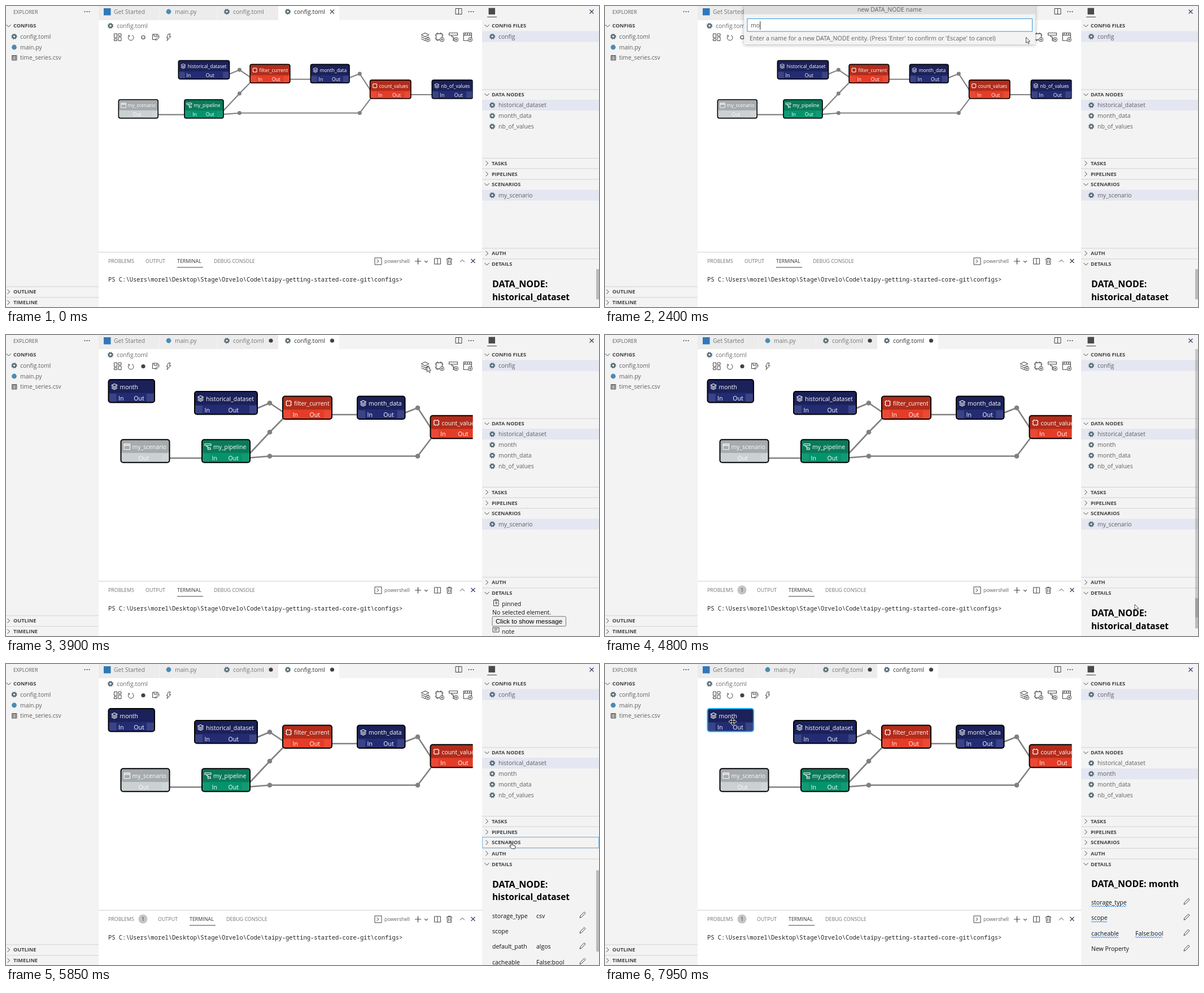
An HTML page for the animation above (8 s loop, 1050 by 533 pixels).

```html
<!DOCTYPE html>
<html lang="en">
<head>
<meta charset="utf-8">
<title>Pipeline editor</title>
<style>
  html, body { margin: 0; width: 100%; height: 100%; overflow: hidden; background: #fff; }
  svg { display: block; width: 100vw; height: 100vh; }
  text { font-family: "Open Sans", "Noto Sans", sans-serif; white-space: pre; }
  .mono { font-family: "Noto Sans Mono", "DejaVu Sans Mono", monospace; }
  .arial { font-family: "Liberation Sans", Arial, sans-serif; }
</style>
</head>
<body>
<svg viewBox="0 0 1050 533">
  <defs>
    <clipPath id="canvas"><rect x="164" y="70" width="662.5" height="365"/></clipPath>
    <filter id="shadow" x="-5%" y="-30%" width="110%" height="160%">
      <feDropShadow dx="0" dy="1" stdDeviation="3" flood-opacity=".3"/>
    </filter>
  </defs>
  <g id="base"></g>
  <g id="scene"></g>
</svg>
<script>
const LOOP = 8000, STEP = 150;
const INK = '#424242', TEXT = '#606060';

// Drawing helpers
const text = (x, y, s, size = 10.4, fill = TEXT, weight = 400, cls = '') =>
  `<text x="${x}" y="${y}" font-size="${size}" fill="${fill}" font-weight="${weight}" class="${cls}">${s}</text>`;
const rect = (x, y, w, h, fill, extra = '') =>
  `<rect x="${x}" y="${y}" width="${w}" height="${h}" fill="${fill}" ${extra}/>`;
const dot = (x, y, r, fill, extra = '') => `<circle cx="${x}" cy="${y}" r="${r}" fill="${fill}" ${extra}/>`;
const path = (d, stroke = INK, width = 1, fill = 'none') =>
  `<path d="${d}" stroke="${stroke}" stroke-width="${width}" fill="${fill}" stroke-linejoin="round"/>`;
const at = (x, y, body, scale = 1) => `<g transform="translate(${x} ${y}) scale(${scale})">${body}</g>`;

const ICONS = {
  layers: 'M0-5L5-2.5L0 0L-5-2.5ZM-5 0L0 2.5L5 0M-5 2.5L0 5L5 2.5',
  chip: 'M-4-4H4V4H-4ZM-2-5.5V-4M2-5.5V-4M-2 4V5.5M2 4V5.5M-5.5-2H-4M-5.5 2H-4M4-2H5.5M4 2H5.5',
  pipe: 'M-5.5-5H5.5V-2H-5.5ZM-2-2V0H0V4M0 2H4.5V5H0Z',
  clap: 'M-5-2H5.5V5H-5ZM-5-2V-5H5.5V-2M-2.5-5L-3.5-2M.5-5L-.5-2M3.5-5L2.5-2',
  down: 'M-4-2L0 2L4-2',
  right: 'M-2-4L2 0L-2 4',
  up: 'M-4 2L0-2L4 2',
  close: 'M-3.5-3.5L3.5 3.5M3.5-3.5L-3.5 3.5',
  split: 'M-5.5-5H5.5V5H-5.5ZM0-5V5',
  plus: 'M-5.5 0H5.5M0-5.5V5.5',
  trash: 'M-5-4H5M-2-4V-5.5H2V-4M-4-4L-3.5 5.5H3.5L4-4M-1.5-2V3.5M1.5-2V3.5',
  prompt: 'M-6-6H6V6H-6ZM-2.5-3L1 0L-2.5 3',
  layout: 'M-6.5-6H-1.5V1H-6.5ZM-6.5 3H-1.5V6.5H-6.5ZM1-6H6V-2H1ZM1 0H6V6.5H1Z',
  refresh: 'M-3.5-3A4.8 4.8 0 1 0 2-4.4M-5-4H-2.6V-1.5',
  save: 'M0 4.5H-5.5V-5H3.5L5.5-3V-1M-3-5V-1.5H2.5V-5M0 5.5L.7 3L5-1.5L6.5 0L2.5 4.5Z',
  zap: 'M-.5-6H3L1-1.5H4L-3 6L-1.2.7H-3.6Z',
  pencil: 'M-5 5.5L-4 2L2.8-5L5-2.8L-1.8 4.2Z',
  clip: 'M-2-4H-4.5V6H4V-4H2M-2-3V-5.5H2V-3ZM0 4V-.5M-2 1.3L0-.7L2 1.3',
  note: 'M-5.5-4.5H5.5V3.5H-5.5ZM-3-2H3M-3 .5H2'
};
const icon = (name, x, y, color = INK, width = 1, scale = 1) =>
  at(x, y, path(ICONS[name], color, width / scale), scale);
const gear = (x, y) =>
  dot(x, y, 2.9, 'none', 'stroke="#546a75" stroke-width="2.2"') +
  dot(x, y, 4.4, 'none', 'stroke="#546a75" stroke-width="1.5" stroke-dasharray="1.73"');
const more = (x, y) => [-4, 0, 4].map(d => dot(x + d, y, 1, INK)).join('');
const wave = (x, y, w) => path(`M${x} ${y}q1-2.4 2 0` + 't2 0'.repeat(w / 2 - 1), '#2a85ea', 1);

const header = (x, y, s, open) =>
  icon(open ? 'down' : 'right', x - 8.5, y) + text(x, y + 3.4, s, 9.2, INK, 700);
const rule = (y, x = 843, w = 207) => rect(x, y, w, 1, '#d2d2d2');
const item = (y, s) => gear(861, y) + text(872, y + 3.7, s);
const selected = y => rect(843, y - 9.5, 207, 19, '#e4e6f1');

// Parts that never change
function base() {
  const tabs = [[164, 107], [272, 101], [374, 108]].map(([x, w]) => rect(x, 0, w, 25, '#ececec')).join('');
  const tools = ['layers', 'chip', 'pipe', 'clap'].map((name, i) => {
    const x = 743 + i * 25;
    return icon(name, x - 1, 54.5, INK, 1.1, 1.35) + dot(x + 4, 59.5, 3.6, '#fff', `stroke="${INK}"`) +
      path(`M${x + 2} 59.5h4m-2-2v4`, INK, .9);
  }).join('');
  return rect(0, 0, 1050, 533, '#fff') + rect(0, 0, 164, 533, '#f3f3f3') + rect(164, 0, 680, 25, '#f3f3f3') +
    rect(843, 0, 207, 533, '#f3f3f3') + tabs + rect(482, 0, 108, 25, '#fff') +
    // explorer
    text(13, 13.5, 'EXPLORER', 9.1) + more(143.5, 10) + header(13, 35, 'CONFIGS', true) +
    gear(14.5, 54) + text(25, 57.7, 'config.toml') +
    dot(14.5, 73, 4.4, '#4a8bb4') + text(25, 76.7, 'main.py') +
    rect(10, 87, 9.5, 9.5, '#6d6d6d', 'rx="1"') + path('M11 89.8H18.5M11 92H18.5M11 94.2H18.5M14.7 89V95.5', '#f3f3f3', .7) +
    text(25, 95.4, 'time_series.csv') +
    rule(496.5, 0, 164) + header(13, 506, 'OUTLINE') + rule(515.5, 0, 164) + header(13, 525, 'TIMELINE') +
    // tabs and breadcrumb
    rect(173, 4, 12.5, 12.5, '#2f78b9') + text(191, 13.7, 'Get Started', 10.4, '#777') +
    dot(288, 10, 4.4, '#4a8bb4') + text(299, 13.7, 'main.py', 10.4, '#777') +
    gear(391, 10) + text(402, 13.7, 'config.toml', 10.5, '#777') +
    gear(499, 10) + text(510, 13.7, 'config.toml', 10.5, '#333') +
    icon('split', 801.5, 9.5) + more(823.5, 10) +
    gear(185, 35) + text(196, 38.7, 'config.toml', 10.5, '#6c6c6c') +
    icon('layout', 198, 55) + icon('refresh', 221, 56) + icon('save', 265, 55) + icon('zap', 288, 55.5) + tools +
    // panel
    rect(164, 435.5, 679, 1, '#cbcbcb') + icon('prompt', 659, 452) + text(670, 455.4, 'powershell', 8.8) +
    icon('plus', 729.5, 452, INK, 1.2) + icon('down', 744, 452.5, INK, 1.1, .7) + icon('split', 764, 452) +
    icon('trash', 785, 452) + icon('up', 808, 451.5) + icon('close', 827, 451.5, '#2f3f66', 1.2) +
    text(181, 487.6, 'PS C:\\Users\\morel\\Desktop\\Stage\\Orvelo\\Code\\taipy-getting-started-core-git\\configs&gt;', 10.48, '#222', 400, 'mono') +
    // side bar
    rect(854.5, 3.5, 11.5, 11.5, '#4a4a4a') + rect(852, 19, 17, 1, INK) + icon('close', 1037, 10, '#2f3f66', 1.2) +
    header(860, 35, 'CONFIG FILES', true) + selected(54) + item(54, 'config') +
    rule(147.5) + header(860, 157, 'DATA NODES', true) +
    rule(269) + header(860, 278.5, 'TASKS') + rule(287.5) + header(860, 297.5, 'PIPELINES') + rule(306.5);
}

// Graph: [header, body, port] colours
const NAVY = ['#1b2159', '#232c73', '#3a4385'], RED = ['#b22c1b', '#e53c27', '#e94935'],
  GREEN = ['#0a7a5a', '#04946c', '#129a74'], GREY = ['#a6abad', '#cbd0d2', '#d0d5d7'];

function node(x, y, w, name, glyph, [dark, light, pale], { input = true, active = false } = {}) {
  const port = px => rect(px, y + 26, 13, 14, pale);
  return rect(x + 1, y + 1, w - 2, 40.5, light, 'rx="4"') +
    rect(x + 2, y + 2, w - 4, 22.5, dark, 'rx="2"') +
    port(x + w - 15) + (input ? port(x + 2) + text(x + 18.5, y + 37.6, 'In', 10.6, '#fff') : '') +
    text(x + (input ? w / 2 + 4 : 32), y + 37.6, 'Out', 10.6, '#fff') +
    icon(glyph, x + 11.5, y + 13.5, '#fff', 1.1) + text(x + 21, y + 17.8, name, 10.4, '#fff') +
    rect(x + 1, y + 1, w - 2, 40.5, 'none', `rx="4" stroke="${active ? '#0ab0f5' : '#000'}" stroke-width="2"`);
}

function graph(added, active) {
  // links run between port centres, under the nodes
  const links = ['M437 133L467 120.5L497.5 141', 'M424 218L467 172L497.5 141', 'M424 218L467 214.5H729L759 175',
    'M570 141H630', 'M698 141L729 129L759 175', 'M282 218H355', 'M833 174.5H894'];
  const joints = [[467, 120.5], [467, 172], [467, 214.5], [729, 214.5], [729, 129]];
  const body = links.map(d => path(d, '#808080', 2.6)).join('') +
    joints.map(([x, y]) => dot(x, y, 4.3, '#808080')).join('') +
    node(333, 99, 113, 'historical_dataset', 'layers', NAVY) +
    node(489, 107.5, 89, 'filter_current', 'chip', RED) +
    node(621, 107.5, 86.5, 'month_data', 'layers', NAVY) +
    node(750.5, 141.7, 91, 'count_values', 'chip', RED) +
    node(885.5, 141.7, 91, 'nb_of_values', 'layers', NAVY) +
    node(202.5, 184.3, 88, 'my_scenario', 'clap', GREY, { input: false }) +
    node(346, 184.3, 87, 'my_pipeline', 'pipe', GREEN) +
    (added ? node(180.5, 78, 83.5, 'month', 'layers', NAVY, { active }) : '');
  const view = added ? '' : 'transform="translate(34 15.2) scale(.8125)"';
  return `<g clip-path="url(#canvas)"><g ${view}>${body}</g></g>`;
}

function panelTabs(problems) {
  const shift = problems ? 22 : 0;
  const tab = (x, s, color = '#727272') => text(x, 455.4, s, 8.9, color);
  return tab(181, 'PROBLEMS') + (problems ? dot(242.5, 451.5, 8, '#c4c4c4') + text(240.2, 455, '1', 8.6, '#333') : '') +
    tab(247 + shift, 'OUTPUT') + tab(303 + shift, 'TERMINAL', '#333') + tab(368 + shift, 'DEBUG CONSOLE') +
    rect(303 + shift, 462.3, 46, 1, INK);
}

// Details pane, top = centre of its header
function details(mode, top) {
  const ink = '#111';
  if (mode === 'none') {
    return icon('clip', 868, 473.5) + text(878, 479.7, 'pinned', 10.5, ink) +
      text(861, 494.5, 'No selected element.', 10.6, ink) +
      rect(861, 498.3, 130.5, 17.4, '#efefef', 'rx="2" stroke="#767676"') +
      text(867, 510.8, 'Click to show message', 11.55, '#000', 400, 'arial') +
      icon('note', 867.5, 522.5) + text(878, 529, 'note', 10.5, ink);
  }
  const row = (y, pen, name, value = '') =>
    text(861, y, name, 10.5, ink) + text(939, y, value, 10.5, ink) + icon('pencil', pen, y - 5.5);
  if (mode === 'month') {
    return text(861, 394.6, 'DATA_NODE: month', 15.9, '#000', 700) +
      row(425.8, 1030, 'storage_type') + row(453.3, 1030, 'scope') +
      row(480.8, 1030, 'cacheable', 'False:bool') + row(508.3, 1030, 'New Property') +
      wave(861, 428.8, 63) + wave(861, 456.3, 28) + wave(861, 483.8, 49) + wave(939, 483.8, 49);
  }
  const rows = [['storage_type', 'csv'], ['scope'], ['default_path', 'algos'], ['cacheable', 'False:bool']];
  return text(861, top + 41.2, 'DATA_NODE:', 16, '#000', 700) +
    text(861, top + 63.5, 'historical_dataset', 15.4, '#000', 700) +
    rows.map(([name, value], i) => row(top + 95.2 + i * 27.4, 1021, name, value)).join('') +
    rect(1045, top + (top > 400 ? 9 : 11), 5, top > 400 ? 53.5 : 144, '#646464', 'opacity=".4"');
}

function sidebar(s) {
  const names = ['historical_dataset', ...(s.added ? ['month'] : []), 'month_data', 'nb_of_values'];
  const list = names.map((n, i) => item(175.5 + i * 18.9, n)).join('');
  const auth = s.folded ? 335.3 : 438, top = auth + 19;
  return selected(s.picked ? 194.5 : 175.5) + list +
    (s.folded ? '' : selected(335) + item(335, 'my_scenario')) + header(860, 316, 'SCENARIOS', !s.folded) +
    rule(auth - 9.5) + header(860, auth, 'AUTH') + rule(auth + 9.5) + header(860, top, 'DETAILS', true) +
    details(s.mode, top) +
    (s.folded && !s.active ? rect(843.5, 306.5, 206, 19, 'none', 'stroke="#78b6e2"') : '') +
    (s.strip ? rect(1045, 25, 5, 475, '#646464', 'opacity=".3"') : '');
}

function popup(t) {
  const typed = [[2700, 'month'], [2550, 'mont'], [2400, 'mo']].find(([start]) => t >= start);
  const ends = { mo: 274.3, mont: 284.3, month: 290.7 };
  const value = typed ? typed[1] : 'DATA_NODE_1';
  const caret = typed && !(t >= 3150 && t < 3450);
  return rect(246, -12, 516, 80, '#f3f3f3', 'filter="url(#shadow)"') + rect(246, 0, 516, 14.5, '#dedede') +
    text(447, 9.6, 'new DATA_NODE name', 10.58) +
    rect(252, 22.5, 504.5, 22.5, '#fff', 'stroke="#3795d8"') +
    (typed ? '' : rect(258, 27, 72, 15, '#add6ff')) + text(258, 38.4, value, 10.4, '#555') +
    (caret ? rect(ends[value], 27, 1, 15, '#222') : '') +
    text(256, 61, "Enter a name for a new DATA_NODE entity. (Press 'Enter' to confirm or 'Escape' to cancel)", 10.58);
}

// Pointer: time, x, y
const TRACK = [[450, 975, 300], [900, 790, 110], [1050, 738, 67], [1200, 735, 62], [1350, 741, 58], [1800, 745.5, 55.5],
  [4050, 745.5, 55.5], [4200, 775, 120], [4650, 930, 440], [4800, 938, 477], [4950, 938, 477], [5250, 925, 420],
  [5550, 900, 335], [5700, 894, 317], [5850, 894, 316], [6000, 926, 400], [6150, 932, 462], [6300, 932, 462],
  [6600, 880, 430], [7350, 523, 235], [7650, 300, 130], [7800, 230, 104], [7950, 226, 102]];

function pointerAt(t) {
  if (t < TRACK[0][0]) return null;
  const i = Math.max(1, TRACK.findIndex(k => k[0] >= t));
  const [t0, x0, y0] = TRACK[i - 1], [t1, x1, y1] = TRACK[i], p = (t - t0) / (t1 - t0);
  return [x0 + (x1 - x0) * p, y0 + (y1 - y0) * p];
}

function pointer([x, y], folded) {
  const arrow = path('M0 0V10L2.4 7.8L4 11.3L5.6 10.6L4.1 7.2H7.2Z', '#222', .8, '#fff');
  const hand = path('M0 0.6Q1-.6 2 .6V4.4L7 5.6Q8.2 6 8 7.4L7 11H1.5L-2.5 6.8Q-2.4 5.2 0 6.8Z', '#222', .9, '#fff');
  const cross = 'M0-6L2-3.5H.5V-.5H3.5V-2L6 0L3.5 2V.5H.5V3.5H2L0 6L-2 3.5H-.5V.5H-3.5V2L-6 0L-3.5-2V-.5H-.5V-3.5H-2Z';
  const move = path(cross, '#fff', 2, '#fff') + path(cross, '#111', .6, '#111');
  if (x > 843) return at(x, y, y < (folded ? 345 : 447) ? hand : arrow);
  return at(x, y, y > 75 ? move : arrow);
}

function draw(t) {
  const pos = pointerAt(t), added = t >= 3900, folded = t >= 5700, picked = t >= 7950;
  const s = {
    added, folded, picked, active: t >= 7800,
    mode: picked ? 'month' : t >= 3900 && t < 4050 ? 'none' : 'dataset',
    strip: pos && pos[0] > 843 && !folded
  };
  const marks = added
    ? dot(469, 10, 3.6, INK) + dot(577.5, 10, 3.6, INK) + dot(243, 55.5, 3.6, INK)
    : icon('close', 577.5, 10, INK, 1.1) + dot(243, 55.5, 3, 'none', `stroke="${INK}" stroke-width="1.2"`);
  return marks + graph(added, s.active) + panelTabs(t >= 4200) + sidebar(s) +
    (t >= 1500 && !added ? popup(t) : '') + (pos ? pointer(pos, folded) : '');
}

const scene = document.getElementById('scene');
document.getElementById('base').innerHTML = base();
let shown = -1;
function tick() {
  const t = Math.floor(performance.now() % LOOP / STEP) * STEP;
  if (t !== shown) scene.innerHTML = draw(shown = t);
  requestAnimationFrame(tick);
}
tick();
</script>
</body>
</html>
```
